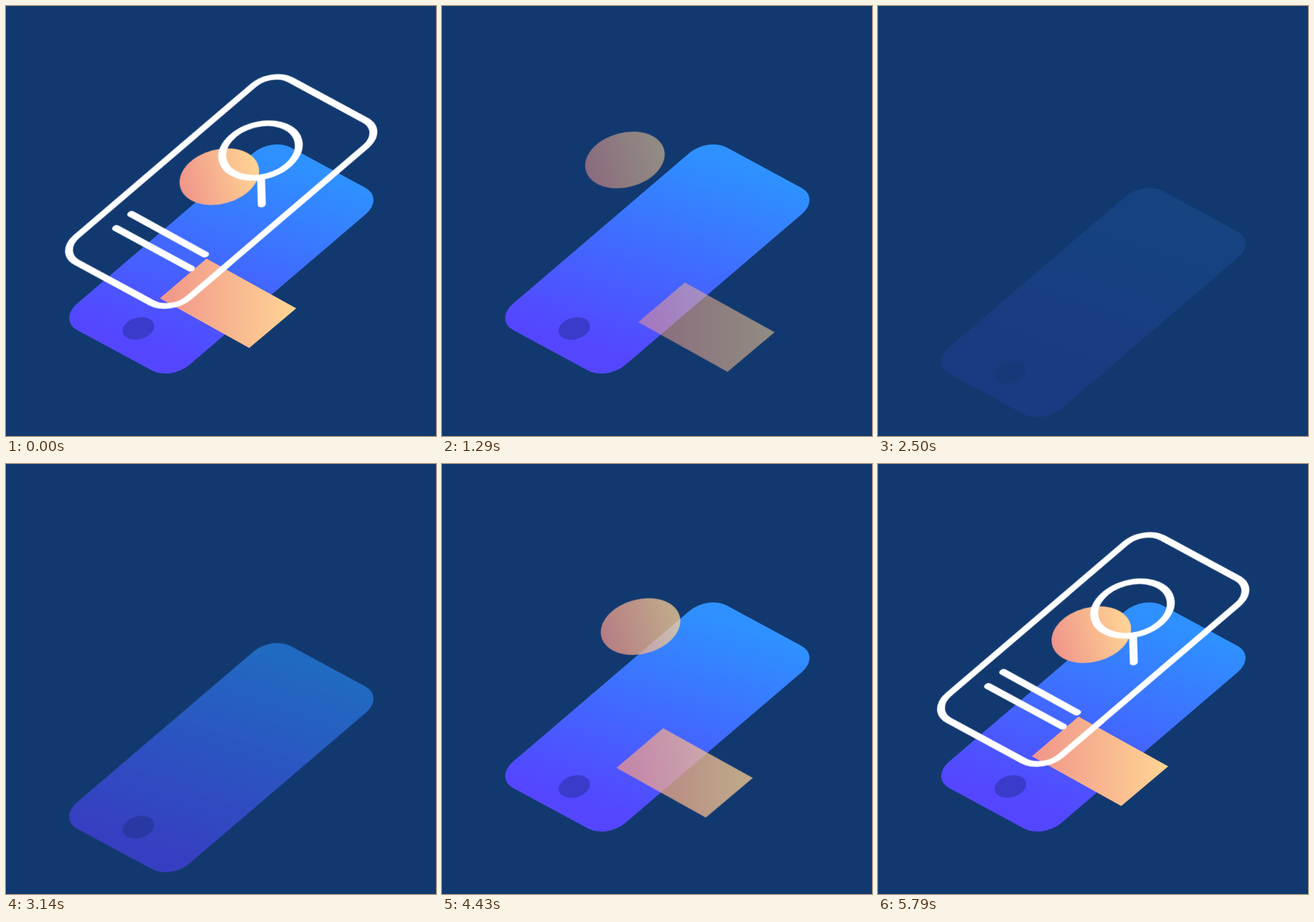
An HTML page that plays this animation: 640 px wide and 640 px high, repeating every 6.07 s.

```html
<!DOCTYPE html>
<html lang="en">
<head>
<meta charset="utf-8">
<title>Layered phone</title>
<style>
  html, body { margin: 0; width: 100%; height: 100%; overflow: hidden; background: #12396f; }
  svg { display: block; width: 100%; height: 100%; }
  .lines { fill: none; stroke: #fff; stroke-width: 12; stroke-linecap: round; }
</style>
</head>
<body>
<svg viewBox="0 0 640 640">
  <defs>
    <linearGradient id="blue" gradientUnits="userSpaceOnUse" x1="-195" y1="50" x2="215" y2="-15">
      <stop stop-color="#5446ff"/>
      <stop offset=".5" stop-color="#406bff"/>
      <stop offset="1" stop-color="#2e91ff"/>
    </linearGradient>
    <linearGradient id="peach">
      <stop stop-color="#f0958a"/>
      <stop offset="1" stop-color="#ffd594"/>
    </linearGradient>
  </defs>

  <!-- Every flat shape lies in one tilted plane: rotate(-15) scale(1 .672) -->
  <g id="phone">
    <g transform="translate(320.5 376.5) rotate(-15) scale(1 .672) rotate(-35.4)">
      <rect x="-231.5" y="-119.5" width="463" height="239" rx="40" fill="url(#blue)"/>
    </g>
    <g transform="translate(197 480) rotate(-15) scale(1 .672)">
      <circle r="24" fill="#3b3bcb"/>
    </g>
  </g>

  <g id="disc">
    <g transform="translate(317.5 254) rotate(-15) scale(1 .672)">
      <circle r="60.3" fill="url(#peach)"/>
    </g>
  </g>

  <polygon id="card" points="298.5,376 432,450 362,509 229,435" fill="url(#peach)"/>

  <g id="frame">
    <g class="lines" transform="translate(320.3 276) rotate(-15) scale(1 .672)">
      <rect x="-231.5" y="-119.5" width="463" height="239" rx="40" transform="rotate(-35.4)"/>
      <circle cx="72.3" cy="-65" r="58"/>
      <path d="M62 -3L53.4 51.3M-138.1 -3.5L-47.5 125.9M-165.3 18L-73.2 147.9"/>
    </g>
  </g>
</svg>

<script>
const LOOP = 6070, FPS = 14, FRAMES = 85;
const SMOOTH = 'cubic-bezier(.333, 0, .667, 1)';
const LATE = 'cubic-bezier(.75, 0, .4, 1)';

// Times in ms: [leave start, leave end, return start, return end]
const shapes = { move: [930, 1380, 3915, 4855], fade: [1036, 1576, 4030, 4570] };
const parts = [
  { id: 'frame', away: [0, 89], move: [20, 520, 4545, 5785], fade: [140, 700, 4890, 5430] },
  { id: 'disc', away: [-51, -28], ...shapes },
  { id: 'card', away: [71, 40], ...shapes },
  { id: 'phone', away: [0, 65], move: [1810, 2260, 2758, 4103], fade: [2027, 2567, 2835, 3375], back: LATE },
];

const animations = [];

function addTrack(element, property, home, away, times, easeOut, easeBack) {
  const [leave, gone, comeBack, settled] = times.map(time => time / LOOP);
  const key = (offset, value, easing = 'linear') => ({ offset, [property]: value, easing });
  const animation = element.animate([
    key(0, home),
    key(leave, home, easeOut),
    key(gone, away),
    key(comeBack, away, easeBack),
    key(settled, home),
    key(1, home),
  ], { duration: LOOP, iterations: Infinity });
  animation.pause();
  animations.push(animation);
}

for (const { id, away, move, fade, back = SMOOTH } of parts) {
  const element = document.getElementById(id);
  addTrack(element, 'transform', 'translate(0px, 0px)',
    `translate(${away[0]}px, ${away[1]}px)`, move, SMOOTH, back);
  addTrack(element, 'opacity', 1, 0, fade, 'linear', 'linear');
}

const start = performance.now();

// Poses advance in steps of the frame rate
function draw() {
  const time = (performance.now() - start) % LOOP;
  const step = Math.min(FRAMES - 1, Math.floor((time + 6) * FPS / 1000));
  for (const animation of animations) animation.currentTime = step * 1000 / FPS;
  requestAnimationFrame(draw);
}
draw();
</script>
</body>
</html>
```
